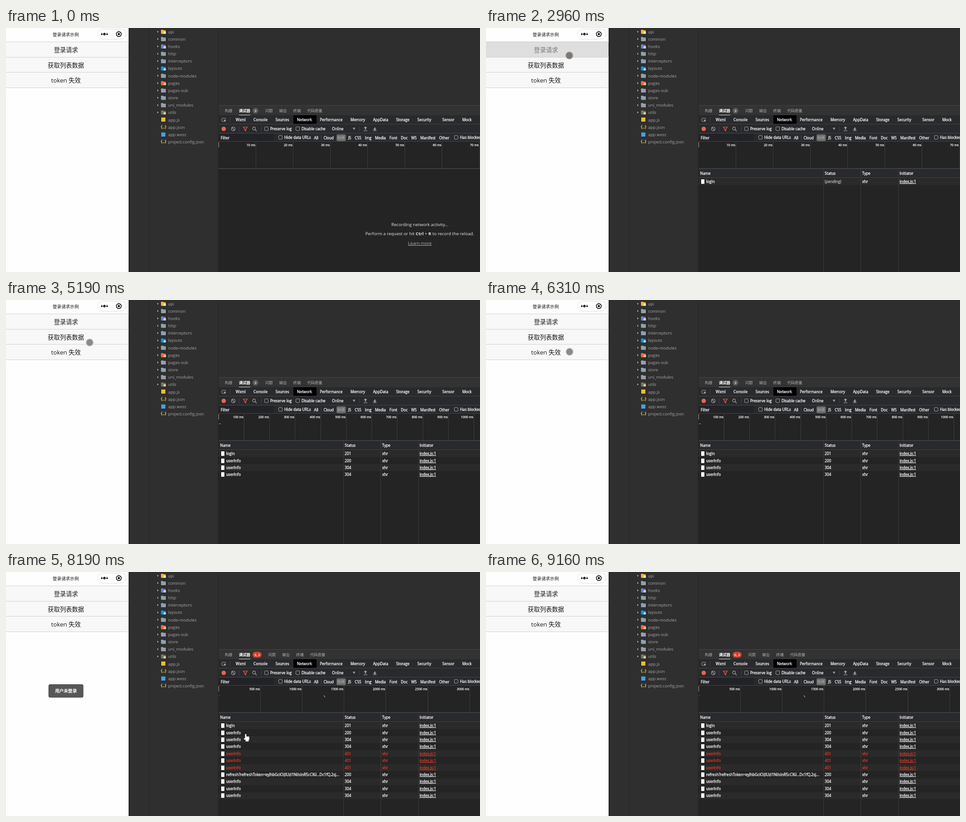
Animation of 1044 by 537 pixels, one loop 9.49 s. Source, as an HTML page with a canvas:

```html
<!DOCTYPE html>
<html lang="zh">
<head>
<meta charset="utf-8">
<title>登录请求示例</title>
<style>
html, body { margin: 0; width: 100%; height: 100%; overflow: hidden; background: #242424; }
canvas { display: block; width: 1044px; height: 537px; }
</style>
</head>
<body>
<canvas id="stage" width="1044" height="537"></canvas>
<script>
const c = document.getElementById('stage').getContext('2d');
const LOOP = 9490, TICK = 70, PRESS = 130, REPLY = 65;
const FONT = '"Open Sans", "Noto Sans CJK SC", "Noto Sans CJK JP", "Noto Sans CJK", sans-serif';
const WHITE = '#fff', BAR = '#292a2d', LINE = '#454545', RED = '#f0624d', ICON = '#a4a4a4';

const login = 2960, list = 4240, expire = 6180, relist = 7630;
const presses = [[login, 0], [list, 1], [expire, 2], [relist, 1]];
const toastOn = 7690, toastOff = 9160;

// the pointer eases to (x, y) between two times and rests there
const entry = { x: 932, y: 514 };
const legs = [
  { from: 200, to: 390, x: 534, y: 321 },
  { from: 590, to: 1470, x: 179, y: 54 },
  { from: 1600, to: 1750, x: 179.5, y: 62.5 },
  { from: 1950, to: 2830, x: 183.5, y: 60.5 },
  { from: 3210, to: 3900, x: 184.5, y: 78.5 },
  { from: 4980, to: 5850, x: 184, y: 114 },
  { from: 6580, to: 7490, x: 187, y: 83 },
  { from: 7830, to: 8190, x: 528, y: 357 },
  { from: 8260, to: 8690, x: 900, y: 505 }
];

const requests = [];
function send(name, count, time, status) {
  for (let i = 0; i < count; i++) requests.push({ name, time, status: i ? status : requests.length === 1 ? 200 : status });
}
send('login', 1, login, 201);
send('userInfo', 3, list, 304);
send('userInfo', 3, relist, 401);
send('refresh?refreshToken=eyJhbGciOiJIUzI1NiIsInR5cCI6I...Dc1fQ.2sj...', 1, relist + REPLY, 200);
send('userInfo', 3, relist + 2 * REPLY, 304);

function paint(fill, stroke, width = 1) {
  if (fill) { c.fillStyle = fill; c.fill(); }
  if (stroke) { c.strokeStyle = stroke; c.lineWidth = width; c.stroke(); }
}
function rect(x, y, w, h, fill) {
  c.fillStyle = fill;
  c.fillRect(x, y, w, h);
}
function round(x, y, w, h, r, fill, stroke) {
  c.beginPath();
  c.roundRect(x, y, w, h, r);
  paint(fill, stroke);
}
function disc(x, y, r, fill, stroke, width) {
  c.beginPath();
  c.arc(x, y, r, 0, 7);
  paint(fill, stroke, width);
}
function poly(x, y, pts, fill, stroke, width) {
  c.beginPath();
  pts.forEach(([px, py]) => c.lineTo(x + px, y + py));
  if (fill || pts.length > 2) c.closePath();
  paint(fill, stroke, width);
}
// y is the middle of the capitals; heavy thickens strokes without widening the text
function text(s, x, y, size, color, align = 'left', heavy = 0, weight = 400) {
  c.font = `${weight} ${size}px ${FONT}`;
  c.textAlign = align;
  c.fillStyle = c.strokeStyle = color;
  c.fillText(s, x, y + size * 0.36);
  if (heavy) {
    c.lineWidth = heavy;
    c.strokeText(s, x, y + size * 0.36);
  }
  return c.measureText(s).width;
}
const ui = (s, x, y, color = WHITE, align) => text(s, x, y, 8.25, color, align, 0.3);

// sets labels side by side, each after the measured width of the one before
function flow(labels, x, y, gap, draw = ui) {
  labels.forEach(s => { x += draw(s, x, y) + gap; });
  return x;
}

function drawPhone(t) {
  rect(0, 0, 270, 537, '#fefefe');
  text('登录请求示例', 131.5, 14.5, 9.6, '#111', 'center');
  round(201.5, 2.5, 63, 22, 11, WHITE, '#dcdcdc');
  for (let i = -1; i <= 1; i++) disc(216.8 + 5.8 * i, 13.5, i ? 1.8 : 2.7, '#000');
  disc(248.5, 13.5, 5.4, null, '#000', 1.6);
  disc(248.5, 13.5, 2.4, '#000');

  ['登录请求', '获取列表数据', 'token 失效'].forEach((label, i) => {
    const on = presses.some(([time, b]) => b === i && t >= time && t < time + PRESS);
    const y = 30.5 + Math.round(33.6 * i);
    round(-4.5, y, on ? 274 : 273, 34, 3, on ? '#dedede' : '#f8f8f8', on ? '#c6c6c6' : '#d0d0d0');
    text(label, 132, y + 17.5, 13.3, on ? '#777' : '#1a1a1a', 'center');
  });
  if (t >= toastOn && t < toastOff) {
    round(93.5, 247, 77, 29.5, 4, '#575757');
    text('用户未登录', 132, 262, 9.6, WHITE, 'center', 0.35);
  }
}

function drawFolder(y, color) {
  poly(333.5, y, [[0, -2], [2.5, 0], [0, 2]], '#d8d8d8');
  round(341.5, y - 4.5, 5, 4, 1, color);
  round(341.5, y - 3.3, 10.5, 8, 1, color);
}

function drawTree() {
  rect(270, 0, 198, 537, '#2f2f2f');
  rect(270, 0, 3, 537, '#292929');
  rect(315, 0, 1, 537, '#222');
  rect(467, 0, 1, 537, '#232323');
  const tint = { api: '#fbb829', hooks: '#6f82c4', layouts: '#0f94dc', pages: '#ff6a3d', utils: '#81773f' };
  const names = 'api common hooks http interceptors layouts node-modules pages pages-sub store uni_modules utils ' +
    'app.js app.json app.wxss project.config.json';
  names.split(' ').forEach((name, i) => {
    const y = 8.2 + 16.15 * i;
    const type = name.split('.').pop();
    if (type === 'json') text('{..}', 347, y - 0.5, 9.5, '#f5b731', 'center', 0.3, 600);
    else if (type !== name) rect(342, Math.round(y - 4.5), 9, 9, type === 'js' ? '#f7bd32' : '#3aa5ee');
    else {
      drawFolder(y, tint[name] || '#8fa3ad');
      if (tint[name]) round(347, y - 0.5, 5.3, 5, 1.5, '#ffffffa8');
    }
    text(name, 357, y + 0.2, 9.25, '#a6a6a6');
  });
}

function drawTabs(t) {
  rect(468, 0, 576, 170, '#2e2e2e');
  rect(468, 170, 576, 1, LINE);
  rect(468, 171, 576, 21, '#333');
  const failed = t >= toastOn;
  const tab = (s, x, y) => text(s, x, y, 8.3, '#b0b0b0');
  text('调试器', 513, 182, 8.3, WHITE, 'left', 0.3);
  tab('构建', 482, 182);
  flow(['问题', '输出', '终端', '代码质量'], failed ? 577.5 : 571, 182, 14.2, tab);
  const pill = failed ? 20 : 13;
  round(543, 175.5, pill, 13, 6.5, failed ? '#d2402f' : '#55585c');
  const count = !failed ? '3' : t < 8610 ? '3, 3' : '6, 3';
  text(count, 543 + pill / 2, 182, 7.6, WHITE, 'center', 0.2);

  rect(468, 192, 576, 20, BAR);
  rect(513, 191, 25, 1, '#ddd');
  round(475.5, 198.5, 8, 7, 1, null, ICON);
  poly(479, 201, [[0, 0], [6, 2.5], [2.5, 6]], '#bbb', BAR, 0.6);
  rect(493, 196, 1, 12, LINE);
  rect(633, 192, 51, 20, '#000');
  flow(['Wxml', 'Console', 'Sources', 'Network', 'Performance', 'Memory', 'AppData', 'Storage', 'Security'], 506, 202.3, 17.4);
  flow(['Sensor', 'Mock'], 961, 202.3, 17.4);
}

function checkbox(label, x, y) {
  round(x + 0.5, y - 4, 8, 8, 1.5, null, ICON);
  ui(label, x + 13, y + 0.6);
}
// dir is 1 for up, -1 for down
function transfer(x, dir) {
  poly(x, 221, [[-3.8, -dir], [0, -4.5 * dir], [3.8, -dir]], ICON);
  rect(x - 1.2, 219, 2.4, 4.5, ICON);
  rect(x - 4, 225.5, 8, 1.2, ICON);
}

function drawToolbar() {
  rect(468, 211, 576, 39, BAR);
  rect(468, 211, 576, 1, LINE);
  disc(479.5, 222, 4.8, RED);
  disc(500.5, 222, 4.2, null, ICON, 1.2);
  poly(500.5, 222, [[-3, -3], [3, 3]], null, ICON, 1.2);
  poly(527, 222, [[-4.5, -4], [4.5, -4], [1.2, 0.3], [1.2, 4.3], [-1.2, 3.4], [-1.2, 0.3]], null, RED, 1.2);
  disc(546.3, 221, 3.2, null, ICON, 1.2);
  poly(548.5, 223.5, [[0, 0], [3.5, 3.5]], null, ICON, 1.4);
  [513, 562, 778].forEach(x => rect(x, 216, 1, 12, LINE));
  checkbox('Preserve log', 569, 221.7);
  checkbox('Disable cache', 638, 221.7);
  ui('Online', 718, 222.3);
  poly(766.5, 221.5, [[-2.7, -2], [2.7, -2], [0, 3]], ICON);
  transfer(791.7, 1);
  transfer(812.3, -1);

  rect(468, 231, 576, 1, LINE);
  rect(469, 233, 121, 16, '#222326');
  ui('Filter', 473, 242);
  checkbox('Hide data URLs', 600, 240.7);
  checkbox('Has blocked cookies', 987, 240.7);
  ui('All', 678.5, 242);
  rect(694, 236, 1, 11, LINE);
  round(728, 234, 20.5, 15, 3, '#6b6b6b');
  flow(['Cloud', 'XHR', 'JS', 'CSS', 'Img', 'Media', 'Font', 'Doc', 'WS', 'Manifest', 'Other'], 699.5, 242, 7.9,
    (s, x, y) => ui(s, x, y, s === 'XHR' ? '#aaa' : WHITE));
}

function drawOverview(t) {
  rect(468, 249, 576, 288, '#242424');
  rect(468, 249, 576, 1, LINE);
  const [unit, gap] = t < list ? [10, 82] : t < relist ? [100, 56.25] : [500, 92.2];
  for (let i = 1; 467.5 + gap * i < 1044; i++) {
    const x = Math.round(467.5 + gap * i);
    rect(x, 250, 1, 59, '#3d3d3d');
    text(`${unit * i} ms`, x - 1, 258, 6.8, WHITE, 'right', 0.25);
  }
  rect(468, 251, 1, 12, ICON);
  if (t >= list) rect(469, 272, 1, 1, '#ddd');
  if (t >= relist) for (let i = 0; i < 2; i++) rect(700 + i, 272 + 2 * i, 2, 1, '#ddd');
  else if (t >= list) rect(471, 272, 2, 1, '#ddd');
  rect(468, 309, 576, 1, '#555');
}

function drawHint() {
  const size = 9.65, color = '#e8e8e8';
  text('Recording network activity...', 911.5, 432.5, size, color, 'center');
  const words = ['Perform a request or hit ', 'Ctrl', ' + ', 'R', ' to record the reload.'];
  flow(words, 791.5, 453, 0, (s, x, y) => text(s, x, y, size, color, 'left', 0, s.length < 5 && s !== ' + ' ? 700 : 400));
  const w = text('Learn more', 911.5, 473.5, size, '#b0b0b0', 'center');
  rect(911.5 - w / 2, 478, w, 1, '#b0b0b0');
}

const column = i => i ? 743 + 82.5 * (i - 1) : 468.5;

function drawTable(t) {
  rect(468, 310, 576, 20, BAR);
  rect(468, 329, 576, 1, LINE);
  ['Name', 'Status', 'Type', 'Initiator'].forEach((s, i) => ui(s, column(i) + 3, 320.5));
  requests.filter(r => t >= r.time).forEach(({ name, time, status }, i) => {
    const y = 338.2 + 15.4 * i;
    if (i % 2 === 0) rect(468, Math.round(y - 7.7), 576, 15, '#2a2a2a');
    const waiting = t < time + REPLY * 2 && status === 201 || t < time + REPLY;
    const color = !waiting && status === 401 ? '#d93a2b' : WHITE;
    rect(474, Math.round(y - 5), 7, 10, WHITE);
    c.save();
    c.beginPath();
    c.rect(468, y - 8, 272, 16);
    c.clip();
    ui(name, 485, y, color);
    c.restore();
    ui(waiting ? '(pending)' : status, column(1) + 3, y, waiting ? '#bbb' : color);
    ui('xhr', column(2) + 3, y, color);
    const w = ui('index.js:1', column(3) + 3, y, color);
    rect(column(3) + 3, Math.round(y + 4), w, 1, color);
  });
  for (let i = 1; i < 4; i++) rect(Math.floor(column(i)), 310, 1, 227, '#3b3b3b');
}

function pointerAt(t) {
  let { x, y } = entry;
  for (const leg of legs) {
    if (t < leg.from) break;
    const span = leg.to - leg.from;
    const passed = Math.min(span, Math.floor((t - leg.from) / TICK + 1e-6) * TICK);
    const done = t >= leg.to ? 1 : 1 - (1 - passed / span) ** 2;
    x += (leg.x - x) * done;
    y += (leg.y - y) * done;
  }
  return [x, y];
}

function drawHand(x, y) {
  const parts = () => {
    c.beginPath();
    c.roundRect(x - 1.4, y - 0.5, 2.8, 11, 1.4);
    c.roundRect(x - 1.4, y + 5, 9.4, 8, 2);
    c.roundRect(x - 0.4, y + 9, 6.8, 7, 1);
    c.roundRect(x - 4, y + 8.5, 4, 3.5, 1.7);
  };
  parts();
  paint(null, '#222', 1.6);
  parts();
  paint(WHITE);
}

function drawPointer(t) {
  if (t < 200 || t >= 8770) return;
  const [x, y] = pointerAt(t);
  if (x < 270) {
    const since = Math.max(...presses.map(([time]) => time <= t + TICK ? time - t : -LOOP));
    const [ring, core] = since > 0 ? ['#dedb78', '#c4c134']
      : since > -PRESS ? ['#aaa196', '#7b7777'] : ['#bdbdbd', '#8a8a8a'];
    disc(x, y, 8.5, ring);
    disc(x, y, 6.9, core);
  } else if (t > login && y > 330 && y < 499) {
    drawHand(x, y);
  } else {
    poly(x, y, [[0, 0], [0, 16], [3.7, 12.6], [6.2, 18.3], [8.6, 17.2], [6.2, 11.7], [11.2, 11.5]], WHITE, '#111', 0.8);
  }
}

function frame(t) {
  drawTree();
  drawTabs(t);
  drawToolbar();
  drawOverview(t);
  if (t < login) drawHint();
  else drawTable(t);
  drawPhone(t);
  drawPointer(t);
}

const begin = performance.now();
function tick() {
  frame((performance.now() - begin) % LOOP);
  requestAnimationFrame(tick);
}
tick();
</script>
</body>
</html>
```
